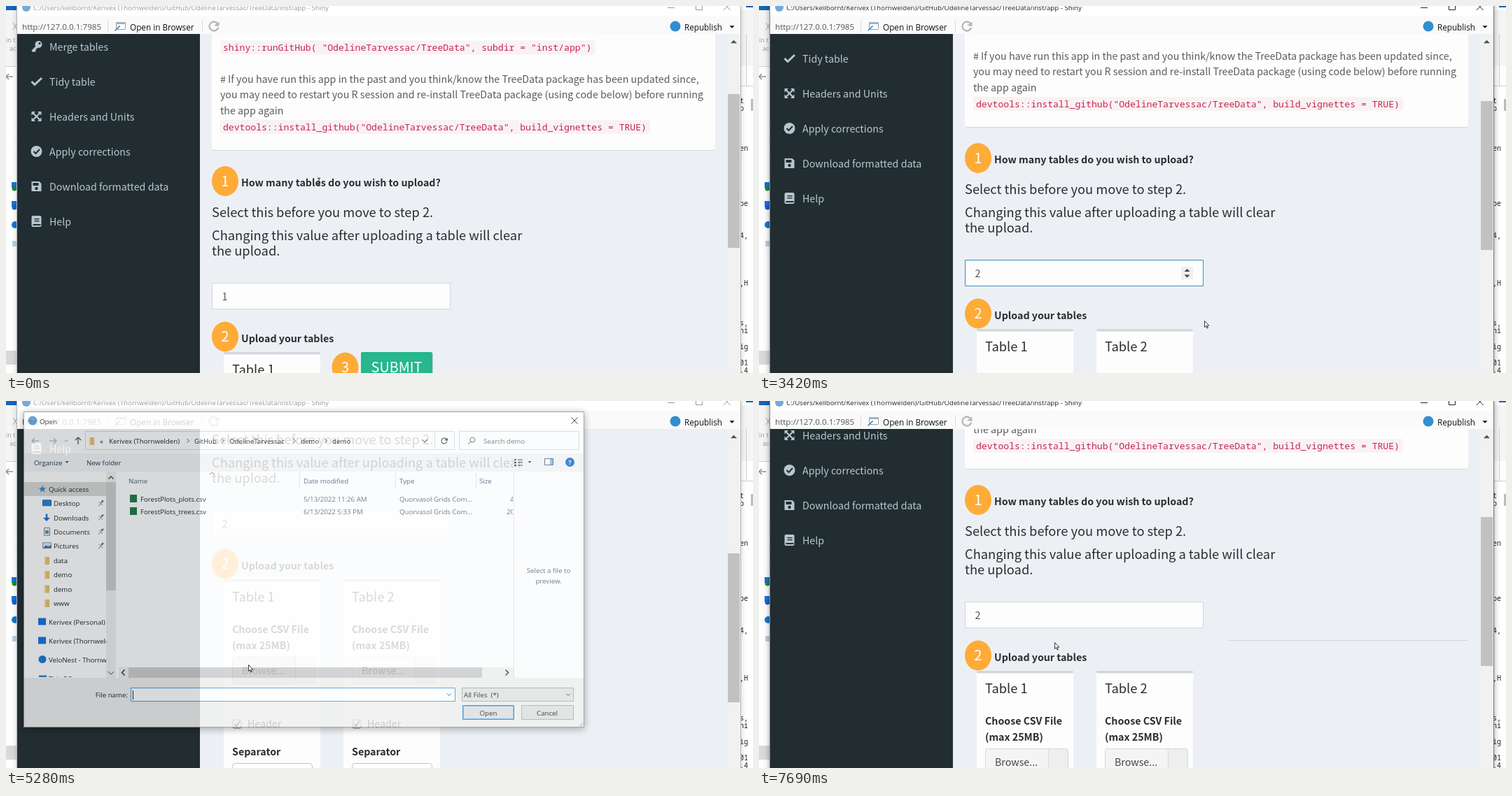
An HTML page with a canvas for the animation above (8 s loop, 1067 px wide and 525 px high).

```html
<!DOCTYPE html>
<html lang="en">
<head>
<meta charset="utf-8">
<title>Table upload</title>
<style>
html, body { margin: 0; width: 100%; height: 100%; overflow: hidden; background: #fff; }
canvas { display: block; }
</style>
</head>
<body>
<canvas id="stage" width="1067" height="525"></canvas>
<script>
const W = 1067, H = 525, LOOP = 8000;
const view = document.getElementById('stage').getContext('2d');
const layer = document.createElement('canvas');
layer.width = W; layer.height = H;
const layerCtx = layer.getContext('2d');
let c = view;

// drop: distance from the middle of the capitals to the baseline
const font = (css, size, ratio) => ({ css, drop: size * ratio });
const BODY = '"Noto Sans CJK JP","Noto Sans CJK SC","Noto Sans CJK",Lato,sans-serif';
const body = s => font(`${s}px ${BODY}`, s, 0.36);
const bold = s => font(`bold ${s}px ${BODY}`, s, 0.36);
const ui = s => font(`${s}px "Open Sans","Noto Sans",sans-serif`, s, 0.43);
const mono = s => font(`${s}px "Noto Sans Mono","DejaVu Sans Mono",monospace`, s, 0.36);
const SMALL = 9.7, BASE = 14.24, HEAD = 18.3, BIG = 20.42;

const REPO = 'OdelineTarvessac', DRIVE = 'Kerivex (Thornwelden)';
const DARK = '#222d32', PALE = '#b8c7ce', TEXT = '#2c2c2c', LINE = '#d2d6de', ORANGE = '#ffab37';

// ---------- drawing helpers ----------
function text(s, x, y, face, color = TEXT, align = 'left') {
  c.font = face.css;
  c.fillStyle = color;
  c.textAlign = align;
  c.fillText(s, x, y + face.drop);
}
function box(x, y, w, h, fill, border, r = 0) {
  const inset = border ? 0.5 : 0;
  c.beginPath();
  c.roundRect(x + inset, y + inset, w - 2 * inset, h - 2 * inset, r);
  if (fill) { c.fillStyle = fill; c.fill(); }
  if (border) { c.strokeStyle = border; c.lineWidth = 1; c.stroke(); }
}
function oval(x, y, rx, ry, fill) {
  c.beginPath();
  c.ellipse(x, y, rx, ry, 0, 0, 7);
  c.fillStyle = fill;
  c.fill();
}
const dot = (x, y, r, fill) => oval(x, y, r, r, fill);
function path(points, close) {
  c.beginPath();
  for (let i = 0; i < points.length; i += 2) c.lineTo(points[i], points[i + 1]);
  if (close) c.closePath();
}
function line(points, color, width = 1) {
  path(points);
  c.strokeStyle = color;
  c.lineWidth = width;
  c.stroke();
}
function poly(points, fill) {
  path(points, true);
  c.fillStyle = fill;
  c.fill();
}
// direction: 1 points down, -1 points up
const tri = (x, y, r, dir, fill) =>
  poly([x - r, y - dir * r / 2, x + r, y - dir * r / 2, x, y + dir * r / 2], fill);
const chevron = (x, y, r, color) => line([x - r, y - r / 2, x, y + r / 2, x + r, y - r / 2], color);
const sideChevron = (x, y, r, dir, color, w = 1) =>
  line([x - dir * r / 2, y - r, x + dir * r / 2, y, x - dir * r / 2, y + r], color, w);
function arrow(x, y, dx, dy, color) {
  line([x - dx * 5, y - dy * 5, x + dx * 5, y + dy * 5], color, 1.2);
  line([x + dx + dy * 4, y + dy + dx * 4, x + dx * 5, y + dy * 5, x + dx - dy * 4, y + dy - dx * 4], color, 1.2);
}
function reload(x, y, r, color, width) {
  c.beginPath();
  c.arc(x, y, r, 0.3, 5.6);
  c.strokeStyle = color;
  c.lineWidth = width;
  c.stroke();
  poly([x + r + 1, y - r, x + r + 1, y, x, y - 1], color);
}

// ---------- timing ----------
// share of a move done after n equally spaced jumps from a to b
function steps(t, a, b, n) {
  if (t < a) return 0;
  if (n < 2) return 1;
  return Math.min(n, Math.floor((t - a) / (b - a) * (n - 1) + 1e-6) + 1) / n;
}
const SCROLL = [[3420, 3420, 1, 197], [3630, 4040, 3, 404], [6330, 6330, 1, 0],
  [6880, 7370, 4, 228], [7690, 7690, 1, 273]];
const POINTER = [[150, 1100, 7, 608, 316], [1220, 2150, 7, 610, 412], [2810, 3130, 3, 636, 450],
  [4330, 4330, 1, 362, 372], [4610, 4610, 1, 346, 377], [5430, 5640, 3, 269, 200],
  [5930, 5930, 1, 267, 158], [6880, 7370, 4, 412, 334], [7690, 7690, 1, 422, 345]];

function stateAt(t) {
  const within = (a, b) => t >= a && t < b;
  let scroll = 164, x = 447, y = 251;
  for (const [a, b, n, to] of SCROLL) scroll += (to - scroll) * steps(t, a, b, n);
  for (const [a, b, n, px, py] of POINTER) {
    const k = steps(t, a, b, n);
    x += (px - x) * k;
    y += (py - y) * k;
  }
  const focus = within(2270, 5150);
  return {
    scroll, x, y, focus,
    shape: t < 2270 && y < 346 ? 'beam' : within(4610, 5280) ? 'hand' : 'arrow',
    active: focus || t >= 6610,
    caret: within(2270, 2810) || within(4610, 5150),
    value: t < 2400 ? 1 : 2,
    two: t >= 2970,
    spinner: focus || (t < 2810 && y > 396),
    press: t < 2810 && y > 396,
    browse: within(4610, 6330),
    uploaded: t >= 6330,
    picked: t >= 5930,
    dialog: within(5280, 5430) ? 0.82 : within(5430, 6330) ? 1 : within(6330, 6480) ? 0.4 : 0,
    size: t >= 6330 ? 0.979 : 1
  };
}

// ---------- desktop and window frame ----------
function desktop() {
  box(0, 0, W, H, '#fff');
  box(0, 6, W, 80, '#f5f5f5');
  box(0, 0, 16, 6, '#1565b8');
  box(1057, 0, 10, 2, '#1565b8');
  line([0, 86.5, 16, 86.5], '#d0d0d0');
  line([1050, 114.5, W, 114.5], '#d0d0d0');
  line([1057.5, 40, 1057.5, 114], '#cfcfcf');
  line([10, 24, 16, 34], '#aaa');
  line([16, 24, 10, 34], '#aaa');
  text('in t', 0, 48, ui(9), '#999');
  text('acc', 5, 60, ui(9), '#999');
  arrow(5, 101, -1, 0, '#777');
  for (let y = 172; y < 240; y += 20) line([14, y, 16, y], '#ccc');
  box(8, 252, 8, 8, '#1673e0');
  dot(12, 261, 3.5, '#1c8a3a');
  box(8, 279, 8, 8, '#1673e0');
  dot(12, 288, 3.5, '#1a5fd0');
  dot(13, 313, 5, '#1678d0');
  box(9, 336, 7, 8, '#b9d3e8');
  box(0, 493, 16, 20, '#d9d9d9');
  const bits = [['t', 135], ['p', 146], ['en', 203], ['be', 282], ['4,', 328], [',H', 396],
    ['s,', 453], ['hi', 464], ['ig', 487], ['01', 510], ['.4', 521]];
  for (const [s, y] of bits) text(s, 1048, y, mono(10), '#222');
  box(1064, 133, 3, 17, '#bbb');
}

function frame(s) {
  c.save();
  c.shadowColor = `rgba(0,0,0,${s.active ? 0.45 : 0.22})`;
  c.shadowBlur = 9;
  box(16, -20, 1033, 600, '#fff');
  c.restore();
  box(15, 0, 1, H, s.active ? '#8a8a8a' : '#b5b5b5');
  box(1049, 0, 1, H, s.active ? '#777' : '#b5b5b5');
  const ink = s.active ? '#222' : '#999';
  dot(29, 2, 6, '#75aadb');
  text(`C:/Users/kellbornt/${DRIVE}/GitHub/${REPO}/TreeData/inst/app - Shiny`, 39, 2, ui(SMALL), ink);
  line([945, 2.5, 955, 2.5], ink);
  box(985, -4, 10, 10, null, ink);
  line([1025, -4, 1034.5, 6], ink);
  line([1034.5, -4, 1025, 6], ink);
  box(16, 14, 1033, 26, '#fafafa');
  text('http://127.0.0.1:7985', 23, 29, ui(11.65), '#555');
  line([145.5, 20, 145.5, 38], '#ddd');
  box(157, 23, 14, 11, '#fff', '#8c9aa5', 1);
  box(157, 23, 14, 3, '#9fb4c4');
  arrow(159, 32, 0.7, -0.7, '#3a87c8');
  text('Open in Browser', 177, 30, ui(11.75), '#111');
  line([280.5, 20, 280.5, 38], '#ddd');
  reload(297, 29, 6.5, '#b4b9bd', 2.4);
  dot(956, 29, 7.5, '#2f8fd0');
  text('Republish', 969, 30, ui(11.7), '#111');
  tri(1037, 30, 3.5, 1, '#111');
}

function scrollbar(s) {
  box(1030, 40, 19, 485, '#f1f1f1');
  tri(1039.5, 51, 4.5, -1, '#505050');
  const h = s.two ? 213 : 220;
  box(1031, Math.round(59 + s.scroll * (s.two ? 0.393 : 0.408)), 17, h, '#c1c1c1');
}

// ---------- sidebar ----------
const ICONS = {
  upload(x, y, k) {
    poly([x, y - 8, x + 6, y - 2, x + 2, y - 2, x + 2, y + 3, x - 2, y + 3, x - 2, y - 2, x - 6, y - 2], k);
    line([x - 7, y + 2, x - 7, y + 6, x + 7, y + 6, x + 7, y + 2], k, 2.6);
  },
  layers(x, y, k) {
    poly([x, y - 8, x + 8, y - 4, x, y, x - 8, y - 4], k);
    for (const d of [1, 5]) line([x - 8, y + d - 1, x, y + d + 2.5, x + 8, y + d - 1], k, 2);
  },
  key(x, y, k) {
    dot(x + 3, y - 3, 5, k);
    dot(x + 4.5, y - 4.5, 1.6, DARK);
    line([x + 1, y, x - 6, y + 7], k, 3.4);
    line([x - 4, y + 6, x - 1, y + 6], k, 3);
  },
  check(x, y, k) { line([x - 7, y, x - 2.5, y + 4.5, x + 7.5, y - 5], k, 3); },
  expand(x, y, k) {
    for (const d of [-1, 1]) {
      line([x - 5, y - 5 * d, x + 5, y + 5 * d], k, 2.2);
      for (const e of [-1, 1])
        poly([x + 7 * d, y + 7 * e, x + 1.5 * d, y + 7 * e, x + 7 * d, y + 1.5 * e], k);
    }
  },
  tick(x, y, k) {
    dot(x, y, 8, k);
    line([x - 4, y, x - 1, y + 3, x + 4.5, y - 3], DARK, 2);
  },
  save(x, y, k) {
    poly([x - 7, y - 7, x + 4, y - 7, x + 7, y - 4, x + 7, y + 7, x - 7, y + 7], k);
    box(x - 5, y - 5, 8, 4, DARK);
    dot(x, y + 3, 2.2, DARK);
  },
  book(x, y, k) {
    box(x - 7, y - 8, 14, 16, k, null, 2);
    box(x - 3, y - 4, 7, 1.4, DARK);
    box(x - 3, y - 1, 7, 1.4, DARK);
    box(x - 5, y + 4, 11, 2, DARK);
  }
};
const MENU = [['upload', 'Upload your file(s)'], ['layers', 'Stack tables'], ['key', 'Merge tables'],
  ['check', 'Tidy table'], ['expand', 'Headers and Units'], ['tick', 'Apply corrections'],
  ['save', 'Download formatted data'], ['book', 'Help']];

function sidebar() {
  box(16, 97, 261, 50, '#1e282c');
  box(16, 97, 3, 50, '#3c8dbc');
  MENU.forEach(([icon, label], i) => {
    const y = 122 + 50 * i, color = i ? PALE : '#fff';
    ICONS[icon](43.5, y, color);
    text(label, 62, y + 0.5, body(BASE), color);
  });
}

// ---------- page ----------
function badge(n, x, y) {
  oval(x, y, 19, 21.5, ORANGE);
  text(n, x, y, body(BIG), '#fff', 'center');
}
function code(s, y) {
  const face = mono(13.1);
  c.font = face.css;
  box(306, y - 10, c.measureText(s).width + 9, 20, '#f9f2f4', null, 3);
  text(s, 310, y, face, '#c7254e');
}
function card(x, y, w, h) {
  box(x, y + 1, w, h, 'rgba(0,0,0,.1)', null, 3);
  box(x, y, w, h, '#fdfdfd', null, 3);
  box(x, y, w, 3.5, LINE, null, 2);
}
function tableCard(n, x, hover) {
  card(x, 659, 138, 500);
  const left = x + 12;
  text('Table ' + n, left, 684.5, body(HEAD));
  text('Choose CSV File', left, 731, bold(BASE));
  text('(max 25MB)', left, 753.5, bold(BASE));
  box(left, 770, 119, 38.5, '#eee', LINE, 3);
  box(left, 770, 91, 38.5, hover ? '#e5e5e5' : '#f4f4f4', hover ? '#adadad' : '#d8d8d8', 3);
  text('Browse...', left + 14, 790, body(BASE), '#444');
  box(left + 0.5, 859.5, 13, 13, '#fdfdfd', '#777', 2);
  line([left + 3.5, 866, left + 6, 869, left + 11, 862], '#333', 2);
  text('Header', left + 22, 866, body(BASE));
  text('Separator', left, 906, bold(BASE));
  box(left, 922, 115, 39, '#fff', '#c4c4c4', 4);
}
function numberField(s) {
  box(294, 560, 341, 38, '#fdfdfd', s.focus ? '#3c8dbc' : LINE);
  text(s.value, 308.5, 579.5, body(BASE), '#555');
  if (s.caret) line([317.5, 569, 317.5, 589], '#222');
  if (!s.spinner) return;
  box(603, 570, 17, 18, '#efefef');
  if (s.press) box(603, 570, 17, 9, '#c4c4c4');
  tri(611.5, 575, 4, -1, '#444');
  tri(611.5, 583.5, 4, 1, '#444');
}

function page(s) {
  c.save();
  c.beginPath();
  c.rect(16, 40, 1014, 485);
  c.clip();
  box(16, 40, 261, 485, DARK);
  box(277, 40, 753, 485, '#ecf0f5');
  c.translate(0, -Math.round(s.scroll));
  sidebar();
  box(16, 40, 261, 57, '#367fa9');
  box(277, 40, 753, 57, '#3c8dbc');
  text('Data harmonisation', 48, 69, font('22.7px "Liberation Sans",Arial,sans-serif', 22.7, 0.36), '#fff');
  for (const y of [62, 67, 72]) box(294, y, 15, 2.4, '#fff');

  const green = '#20b58a';
  text('If your connexion is slow and/or your data is very large, you may want to', 653.5, 137, bold(BIG), green, 'center');
  text('run this app locally. For that, open R Studio and type:', 651.5, 169, bold(BIG), green, 'center');
  card(294, 190, 719, 180);
  code(`shiny::runGitHub( "${REPO}/TreeData", subdir = "inst/app")`, 223.5);
  const note = '#5c5c5c';
  text('# If you have run this app in the past and you think/know the TreeData package has been updated since,', 306, 268.5, body(BASE), note);
  text('you may need to restart you R session and re-install TreeData package (using code below) before running', 306, 291, body(BASE), note);
  text('the app again', 306, 314, body(BASE), note);
  code(`devtools::install_github("${REPO}/TreeData", build_vignettes = TRUE)`, 337);

  badge(1, 313, 414.5);
  text('How many tables do you wish to upload?', 336, 417, bold(BASE));
  text('Select this before you move to step 2.', 294, 459, body(HEAD));
  text('Changing this value after uploading a table will clear', 294, 492.5, body(HEAD));
  text('the upload.', 294, 514.5, body(HEAD));
  numberField(s);

  badge(2, 313, 637);
  text('Upload your tables', 336, 639.5, bold(BASE));
  tableCard(1, 311, s.browse);
  if (s.two) tableCard(2, 482, false);
  else {
    badge(3, 484.5, 681);
    box(507, 660, 103, 46, 'rgba(0,0,0,.15)', null, 2);
    box(507, 659, 102, 45, '#26b78c', null, 2);
    text('SUBMIT', 558, 681, body(19.8), '#fff', 'center');
  }
  if (s.uploaded) line([671, 615.5, 1013, 615.5], '#d0d5da');
  c.restore();
}

// ---------- file dialog ----------
const folder = (x, y) => {
  box(x - 3, y - 5, 7, 11, '#e9c46a');
  box(x - 3, y - 5, 2, 11, '#f6dc94');
};
const label = (s, x, y, color = '#222', align) => text(s, x, y, ui(SMALL), color, align);

function tree() {
  c.save();
  c.beginPath();
  c.rect(26, 101, 117, 294);
  c.clip();
  box(26, 116, 117, 20, '#d9d9d9');
  const star = [];
  for (let i = 0; i < 10; i++) {
    const r = i % 2 ? 2.3 : 5.5, a = i * Math.PI / 5 - Math.PI / 2;
    star.push(52 + r * Math.cos(a), 126 + r * Math.sin(a));
  }
  poly(star, '#2f86d0');
  label('Quick access', 61, 126);
  ['Desktop', 'Downloads', 'Documents', 'Pictures'].forEach((s, i) => {
    const y = 146.3 + 20.3 * i;
    label(s, 68, y);
    if (i === 1) {
      line([58, y - 5, 58, y + 3], '#1673c8', 2.5);
      tri(58, y + 3, 5, 1, '#1673c8');
    } else if (i === 2) {
      box(54, y - 6, 9, 12, '#f5f8fa', '#7d8b96');
      box(56, y - 2, 5, 5, '#5f8fb5');
    } else {
      box(52, y - 5, 13, 9, i ? '#dce9f2' : '#2583d3', i ? '#8596a2' : '#1b69ad');
      if (i) poly([53, y + 3, 57, y - 1, 60, y + 1, 64, y - 1, 64, y + 3], '#3b6f9a');
    }
    line([132, y + 4, 136, y], '#777');
    line([133, y - 2, 138, y + 3], '#777');
    line([136, y - 1, 139, y - 4], '#777', 2.5);
  });
  ['data', 'demo', 'demo', 'www'].forEach((s, i) => {
    folder(58, 228 + 20.3 * i);
    label(s, 68, 228 + 20.3 * i);
  });
  ['Kerivex (Personal)', DRIVE, 'VeloNest - Thornwelden', 'This PC'].forEach((s, i) => {
    const y = 315.5 + 27 * i;
    if (i < 2) box(46, y - 5, 11, 10, '#1673e0');
    else if (i === 2) dot(52, y, 5.5, '#1678d0');
    else box(47, y - 4, 11, 8, '#2583d3');
    label(s, 61, y);
  });
  c.restore();
  box(143, 101, 14, 295, '#f0f0f0');
  box(143, 116, 14, 155, '#cdcdcd');
  line([146.5, 111.5, 150, 108, 153.5, 111.5], '#444', 1.3);
  chevron(150, 389, 4, '#444');
}

function fileList(s) {
  const grey = '#5d6670';
  if (s.picked) box(171, 149, 554, 18, '#cce8ff');
  line([291, 105, 294.5, 102, 298, 105], '#777');
  [['Name', 175], ['Date modified', 425], ['Type', 562], ['Size', 676]].forEach(([s, x]) => label(s, x, 114, '#4c607a'));
  for (const x of [419.5, 556.5, 671.5]) line([x, 102, x, 125], '#e0e0e0');
  c.save();
  c.beginPath();
  c.rect(160, 100, 564, 290);
  c.clip();
  [['ForestPlots_plots.csv', '5/13/2022 11:26 AM', '4 KB', 720],
    ['ForestPlots_trees.csv', '6/13/2022 5:33 PM', '205 KB', 715]].forEach(([name, date, size, x], i) => {
    const y = 140 + 18 * i;
    box(177, y - 6, 10, 11, '#1f7a45');
    label(name, 192, y);
    label(date, 425, y, grey);
    label('Quorvasol Grids Com...', 562, y, grey);
    label(size, x, y, grey);
  });
  c.restore();
  box(161, 381, 564, 15, '#f0f0f0');
  box(175, 381, 505, 15, '#cdcdcd');
  sideChevron(167.5, 388.5, 4, -1, '#333', 1.5);
  sideChevron(715.5, 388.5, 4, 1, '#333', 1.5);
  line([725.5, 101, 725.5, 396], '#e5e5e5');
  label('Select a file to', 775, 242, grey, 'center');
  label('preview.', 775, 257, grey, 'center');
}

function dialog(s) {
  c.clearRect(0, 0, W, H);
  c.save();
  c.shadowColor = 'rgba(0,0,0,.4)';
  c.shadowBlur = 10;
  c.shadowOffsetY = 2;
  box(25, 15, 801, 452, '#fff');
  c.restore();
  box(25, 15, 801, 452, '#fff', '#8f979e');
  const ink = s.uploaded ? '#aaa' : '#222';
  dot(38, 28, 6.5, s.uploaded ? '#c5d9ec' : '#4d8fcc');
  label('Open', 48, 29, ink);
  line([807.5, 23.5, 816.5, 32.5], ink);
  line([816.5, 23.5, 807.5, 32.5], ink);

  arrow(42, 57, -1, 0, '#b5b5b5');
  arrow(67, 57, 1, 0, '#b5b5b5');
  chevron(86, 57, 2.5, '#999');
  arrow(103, 57, 0, -1, '#444');
  box(113, 43, 528, 27, '#fff', '#d9d9d9');
  folder(122, 57);
  label('«', 134, 57);
  [[DRIVE, 147], ['GitHub', 269], [REPO, 319], ['demo', 421], ['demo', 466]].forEach(([name, x], i) => {
    label(name, x, 57);
    if (i) sideChevron(x - 9, 57, 3, 1, '#555');
  });
  chevron(598, 57, 4, '#444');
  line([612.5, 44, 612.5, 69], '#d9d9d9');
  reload(626, 57, 4, '#444', 1.2);
  box(647, 43, 172, 27, '#fff', '#d9d9d9');
  c.beginPath();
  c.arc(666.5, 55.5, 3.5, 0, 7);
  c.strokeStyle = '#666';
  c.lineWidth = 1;
  c.stroke();
  line([664, 58, 660, 62], '#666');
  label('Search demo', 682, 57, '#6d6d6d');

  box(26, 75, 799, 26, '#f5f6f7');
  label('Organize', 40, 88, '#1e395b');
  tri(87, 87.5, 2.5, 1, '#1e395b');
  label('New folder', 115, 88, '#1e395b');
  for (let i = 0; i < 3; i++) {
    box(726, 83 + 4 * i, 3, 2, '#666');
    box(731, 83 + 4 * i, 7, 2, '#999');
  }
  tri(748, 87.5, 2.5, 1, '#1e395b');
  box(769, 82, 13, 10, '#fff', '#4d6b8a');
  box(777, 83, 4, 8, '#8fb5da');
  dot(805.5, 87.5, 6.5, '#1673c8');
  text('?', 805.5, 87.5, font('bold 9px "Open Sans",sans-serif', 9, 0.36), '#fff', 'center');

  tree();
  fileList(s);

  box(26, 396, 799, 70, '#f0f0f0');
  label('File name:', 174, 420, '#222', 'right');
  box(178, 410, 464, 20, '#fff', '#4a98dc');
  if (s.picked) label('ForestPlots_trees.csv', 181, 420);
  else line([181.5, 414, 181.5, 427], '#222');
  chevron(633, 420, 3, '#555');
  box(651, 410, 160, 20, '#e4e4e4', '#adadad');
  label('All Files  (*)', 654, 420);
  chevron(803, 420, 3, '#555');
  box(652, 435, 74, 21, '#e1e1e1', '#2f8bd8');
  box(653, 436, 72, 19, null, '#7fb8e8');
  label('Open', 689, 446, '#222', 'center');
  box(736, 435, 75, 21, '#e1e1e1', '#adadad');
  label('Cancel', 773, 446, '#222', 'center');
  for (let i = 0; i < 3; i++) line([824 - 2.5 * i, 465, 824, 465 - 2.5 * i], '#aaa');
}

// ---------- pointer ----------
function pointer({ shape, x, y }) {
  c.save();
  c.translate(Math.round(x), Math.round(y));
  if (shape === 'beam') {
    line([-2, -5, 0, -4.5, 2, -5], '#222');
    line([0, -4.5, 0, 4.5], '#222');
    line([-2, 5, 0, 4.5, 2, 5], '#222');
  } else {
    path(shape === 'hand'
      ? [-1, 1, 1, 1, 1, 5, 5, 6, 5, 9, 4, 13, -1, 13, -4, 9, -3, 8, -1, 9]
      : [0.5, 0.5, 0.5, 9.5, 2.6, 7.6, 4, 11, 5.3, 10.4, 4, 7.2, 6.8, 7.2], true);
    c.fillStyle = '#fff';
    c.fill();
    c.strokeStyle = '#222';
    c.lineWidth = 0.9;
    c.stroke();
  }
  c.restore();
}

function draw() {
  const s = stateAt(performance.now() % LOOP);
  c = view;
  desktop();
  frame(s);
  page(s);
  scrollbar(s);
  if (s.dialog) {
    c = layerCtx;
    dialog(s);
    c = view;
    c.save();
    c.globalAlpha = s.dialog;
    c.translate(425, 240.5);
    c.scale(s.size, s.size);
    c.drawImage(layer, -425, -240.5);
    c.restore();
  }
  pointer(s);
  requestAnimationFrame(draw);
}
draw();
</script>
</body>
</html>
```
